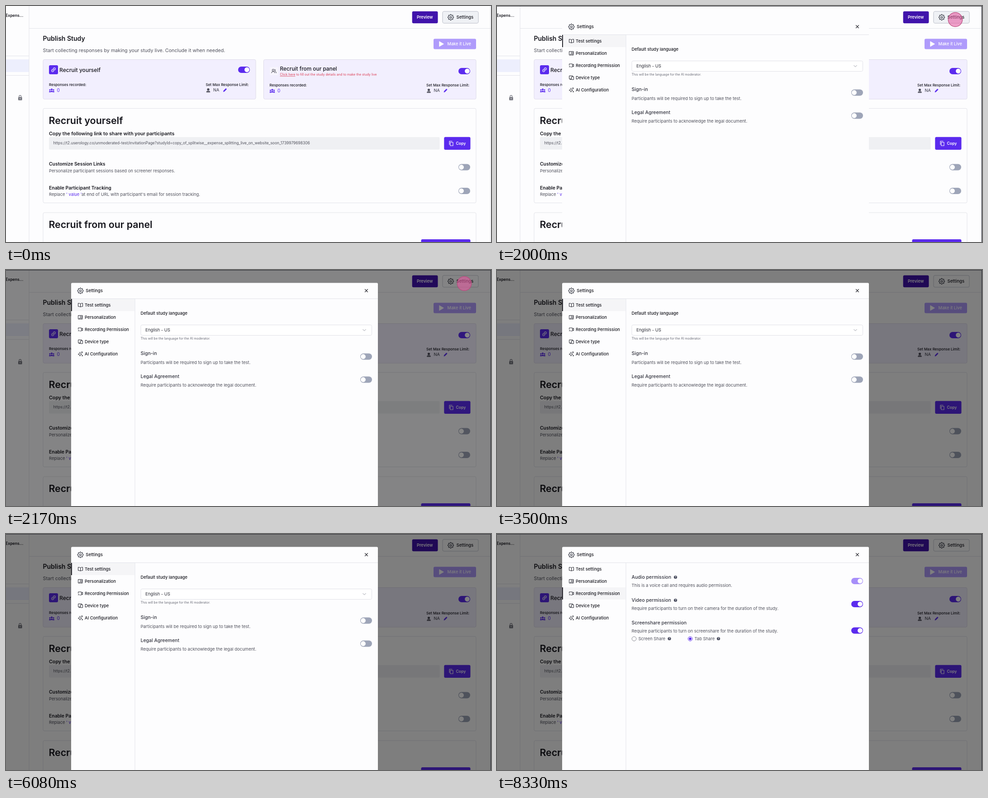
Animation of 1072x522 px, one loop 8.5 s. Source, as an HTML page:

```html
<!DOCTYPE html>
<html lang="en">
<head>
<meta charset="utf-8">
<title>Study settings</title>
<style>
html, body { margin: 0; width: 100%; height: 100%; overflow: hidden; background: #fdfdfe; }
svg { display: block; width: 100%; height: 100%; }
text { font-family: Inter, "Open Sans", sans-serif; white-space: pre; }
</style>
</head>
<body>
<svg id="stage" viewBox="0 0 1072 522"></svg>
<script>
const NS = 'http://www.w3.org/2000/svg';
const LOOP = 8500;
const INK = '#16161d', BODY = '#50515c', PURPLE = '#5b2bee', LINE = '#e2e3e9';
const stage = document.getElementById('stage');
let layer = stage;

function add(tag, attrs, text) {
  const el = document.createElementNS(NS, tag);
  for (const k in attrs) el.setAttribute(k, attrs[k]);
  if (text) el.textContent = text;
  layer.appendChild(el);
  return el;
}
function group(parent, draw) {
  const old = layer;
  layer = parent;
  const g = add('g', {});
  layer = g;
  draw();
  layer = old;
  return g;
}
const rect = (x, y, width, height, fill, rx = 0, stroke = 'none') =>
  add('rect', { x, y, width, height, fill, rx, stroke });
const text = (x, y, size, str, fill = INK, weight = 400) =>
  add('text', { x, y, 'font-size': size, 'font-weight': weight, fill }, str);
const dot = (cx, cy, r, fill, stroke = 'none', width = 1) =>
  add('circle', { cx, cy, r, fill, stroke, 'stroke-width': width });
const rule = (x1, y1, x2, y2, stroke = LINE) => add('line', { x1, y1, x2, y2, stroke });
// Line icon drawn around its centre
const icon = (x, y, d, stroke = INK, width = 1.1, fill = 'none') =>
  add('path', { d, transform: `translate(${x} ${y})`, stroke, fill, 'stroke-width': width,
    'stroke-linecap': 'round', 'stroke-linejoin': 'round' });

function toggle(x, y, on, color = on ? PURPLE : '#9ea5b8') {
  rect(x - 13, y - 7, 26, 14, color, 7);
  dot(x + (on ? 6.5 : -6.5), y, 5.4, '#fff');
}
function gear(x, y) {
  const pts = [];
  for (let i = 0; i < 32; i++) {
    const a = (i - 0.5) * Math.PI / 16, r = i % 4 < 2 ? 6.4 : 4.9;
    pts.push((r * Math.cos(a)).toFixed(2) + ' ' + (r * Math.sin(a)).toFixed(2));
  }
  icon(x, y, 'M' + pts.join('L') + 'Z', '#2c2f3a');
  dot(x, y, 2, 'none', '#2c2f3a', 1.1);
}
function people(x, y) {
  for (const [dx, dy, r] of [[-4, -1, 1.5], [4, -1, 1.5], [0, -2, 2]]) {
    dot(x + dx, y + dy, r, PURPLE);
    icon(x + dx, y + dy + r + .8, `M${-r} 2.6V1.6Q${-r} 0 0 0T${r} 1.6V2.6Z`, PURPLE, .4, PURPLE);
  }
}
function help(x, y) {
  dot(x, y, 3.6, '#474a5c');
  text(x - 1.6, y + 2.1, 5.6, '?', '#fff', 700);
}
function counts(x, y) {
  text(x, y, 8.15, 'Responses recorded:', INK, 500);
  people(x + 6, y + 9.5);
  text(x + 17.5, y + 13, 10, '0', PURPLE);
  text(x + 346.5, y, 8.15, 'Set Max Response Limit:', INK, 500);
  dot(x + 352, y + 7.5, 2.6, '#4a4b57');
  icon(x + 352, y + 11, 'M-3.8 2.6V1.2Q-3.8 0 0 0T3.8 1.2V2.6Z', '#4a4b57', .6, '#4a4b57');
  text(x + 363, y + 12, 9.2, 'NA', '#33343f');
  icon(x + 389, y + 9, 'M-3.5 3.5L-3 1.2L2 -3.8L3.8 -2L-1.2 3Z', PURPLE, .5, PURPLE);
}

function sidebar() {
  text(-1, 24, 8.7, 'Expens...', INK, 600);
  rule(0, 110.5, 51, 110.5);
  rect(0, 118, 51, 28, '#edeffd');
  rule(0, 153.5, 51, 153.5);
  rect(27, 201.5, 8.5, 7, '#75767f', 1);
  icon(31.2, 201, 'M-2.3 1V-1A2.3 2.3 0 0 1 2.3 -1V1', '#75767f', 1.2);
  dot(31.2, 205, 1, '#fff');
  rule(51, 0, 51, 522);
}
function topBar() {
  rule(51, 49.5, 1072, 49.5);
  rect(897.7, 11.8, 56.8, 26.4, '#4013ab', 3);
  text(908, 28.3, 9.2, 'Preview', '#fff', 600);
  rect(965, 12, 79, 26, '#fdfdfe', 3, '#c6c9d2');
  hover = rect(965, 12, 79, 26, '#eff1f5', 3, '#c6c9d2');
  gear(983, 25);
  text(995.5, 28.3, 9.6, 'Settings', INK, 500);
}
function cards() {
  text(81.5, 76.5, 14, 'Publish Study', INK, 600);
  text(81.5, 102, 10.72, 'Start collecting responses by making your study live. Conclude it when needed.', BODY);
  rect(945, 72.5, 94, 23, '#af9bfb', 3);
  icon(962.5, 84, 'M-4.5 -5.5L5 0L-4.5 5.5Z', '#fff', .8, '#fff');
  text(975.5, 87.4, 9.2, 'Make it Live', '#fff', 500);

  rect(82, 118.5, 470, 87.5, '#f2effe', 3, '#dedbea');
  rect(95, 131, 20, 20, PURPLE, 3);
  icon(105, 141, 'M-1 -2.2L.8 -4A2.3 2.3 0 0 1 4 -.8L2.2 1M1 2.2L-.8 4A2.3 2.3 0 0 1 -4 .8L-2.2 -1M-1.5 1.5L1.5 -1.5', '#fff', 1.1);
  text(118, 145.5, 12.05, 'Recruit yourself', INK, 500);
  toggle(526, 141, true);
  counts(95, 177);

  rect(569.5, 118.5, 469.5, 87.5, '#f2effe', 3, '#dedbea');
  rect(583, 135, 19, 18, '#f7f5fd', 2);
  dot(590.5, 142, 2.2, 'none', '#33343f');
  icon(592, 148, 'M-5.3 0Q-4.8 -3.2 -1.5 -3.2T2.3 0M2 -8A2.2 2.2 0 0 1 2 -3.8M3 -3.2Q5.3 -2.8 5.5 0', '#33343f', 1);
  text(605.5, 143, 11.85, 'Recruit from our panel', INK, 500);
  const note = text(605.5, 154.3, 7.18, '', '#dc3f55');
  for (const [str, line] of [['Click here', 'underline'], [' to fill out the study details and to make the study live', 'none']]) {
    const span = document.createElementNS(NS, 'tspan');
    span.textContent = str;
    span.setAttribute('text-decoration', line);
    note.appendChild(span);
  }
  toggle(1013, 144, true);
  counts(582.5, 178);
}
function linkBox() {
  rect(82, 226.5, 957, 209, '#fdfdfe', 3, LINE);
  text(94.5, 261, 21.4, 'Recruit yourself', INK, 600);
  text(95, 286.3, 10.7, 'Copy the following link to share with your participants', INK, 600);
  rect(95, 290, 863.5, 27.5, '#eff0f3', 2);
  text(104.5, 306.3, 8.44, 'https://t2.userology.co/unmoderated-test/invitationPage?studyId=copy_of_splitwise__expense_splitting_live_on_website_soon_1739979698306', BODY);
  rect(968.3, 289.8, 58.2, 28.2, PURPLE, 3);
  icon(984, 304, 'M-2 -2.5H4V5H-2ZM-4 2.5V-5H2', '#fff', 1.1);
  text(994.5, 307.2, 8.6, 'Copy', '#fff', 600);
  text(95, 353, 10.35, 'Customize Session Links', INK, 600);
  text(95, 367.8, 9.36, 'Personalize participant sessions based on screener responses.', BODY);
  toggle(1013, 356.5, false);
  text(95, 405.5, 10.4, 'Enable Participant Tracking', INK, 600);
  text(95, 420, 9.4, 'Replace', BODY);
  text(133, 420, 9.4, "' value '", PURPLE);
  text(167, 420, 9.52, "at end of URL with participant's email for session tracking.", BODY);
  toggle(1013, 409, false);
  rect(82, 457, 957, 90, '#fdfdfe', 3, LINE);
  text(94.5, 490.7, 21.3, 'Recruit from our panel', INK, 600);
  rect(917.5, 516, 109, 20, PURPLE, 3);
}

function testPane() {
  text(297.5, 98.5, 9.35, 'Default study language', INK, 500);
  rect(298, 121.5, 510.5, 23, '#fff', 3, '#e0e1e7');
  text(308, 136.2, 9.45, 'English - US', '#2b2c36');
  icon(792, 133, 'M-3.2 -1.6L0 1.6L3.2 -1.6', '#92959f', 1);
  text(297.5, 154.3, 7.08, 'This will be the language for the AI moderator.', '#686a75');
  text(297.5, 188, 10.5, 'Sign-in', '#33343f', 500);
  text(297.5, 207.5, 9.47, 'Participants will be required to sign up to take the test.', BODY);
  toggle(796, 191.5, false);
  text(297.5, 239, 10.5, 'Legal Agreement', '#33343f', 500);
  text(297.5, 258.2, 9.52, 'Require participants to acknowledge the legal document.', BODY);
  toggle(796, 242.5, false);
}
function recordPane() {
  const rows = [
    [99, 'Audio permission', 'This is a voice call and requires audio permission.', 104, '#a78ff9'],
    [150, 'Video permission', 'Require participants to turn on their camera for the duration of the study.', 155, PURPLE],
    [200, 'Screenshare permission', 'Require participants to turn on screenshare for the duration of the study.', 213.5, PURPLE]
  ];
  rows.forEach(([y, title, info, ty, color], i) => {
    text(297.5, y, 10.5, title, '#33343f', 500);
    text(297.5, y + 17.5, 9.47, info, BODY);
    toggle(796, ty, true, color);
    if (i < 2) help(394.5, y - 3.5);
  });
  dot(303, 231.8, 4.8, '#fff', '#81838d');
  text(312.5, 235.3, 9.4, 'Screen Share', BODY);
  help(381, 231.5);
  dot(427, 231.8, 4.8, '#fff', PURPLE);
  dot(427, 231.8, 2.9, PURPLE);
  text(436.5, 235.3, 9.4, 'Tab Share', BODY);
  help(489.5, 231.5);
}
function activeRow(y) {
  rect(144.5, y, 140, 27, '#f5f5f7');
  rect(144, y, 1.8, 27, '#16161d');
}
function modalFrame() {
  add('path', { d: 'M144 522V31Q144 28.5 146.5 28.5H819.5Q822 28.5 822 31V522Z', fill: '#fdfdfe' });
  gear(164.5, 46);
  text(176.3, 49.3, 9.6, 'Settings', INK, 500);
  icon(796.5, 45.7, 'M-3 -3L3 3M3 -3L-3 3', INK, 1.2);
}
function modalMenu() {
  rule(144, 63.5, 822, 63.5);
  rule(285, 64, 285, 522);
  const items = [
    ['Test settings', 'M0 -2.8Q-1 -4 -5 -4V3.2Q-1 3.2 0 4.2Q1 3.2 5 3.2V-4Q1 -4 0 -2.8V4'],
    ['Personalization', 'M-4.5 -4H4.5V4H-4.5ZM-2.3 4V2.5Q0 .4 2.3 2.5V4M0 -2.3A1.2 1.2 0 1 0 .1 -2.3M3 -2V1'],
    ['Recording Permission', 'M-4.8 -1V-3.5H2.2V3.5H-.5M2.2 -.8L5 -2.8V2.8L2.2 .8M-4.8 1.2A2.4 2.4 0 0 1 -2.4 3.6M-4.8 3.6H-4.6'],
    ['Device type', 'M-1 2.5H-4.8V-4H3V-2.5M-3.5 4H-1M.6 -2H5V4.3H.6Z'],
    ['AI Configuration', 'M-1 -3.6Q-.6 .4 3.2 .7Q-.6 1 -1 5Q-1.4 1 -5.2 .7Q-1.4 .4 -1 -3.6ZM3.4 -5V-2M1.9 -3.5H4.9M4 3V5M3 4H5']
  ];
  items.forEach(([label, d], i) => {
    const y = 77.5 + 27 * i;
    icon(164.5, y, d, '#24252e', 1);
    text(174, y + 3.4, 9.4, label, INK, 500);
  });
}
function clickMark(x, y) {
  dot(x, y, 15.7, 'rgba(230, 90, 160, .58)', '#b84a7c', 1.2);
}

// Opacity from [ms, value] pairs; each value holds until the next one
function hold(el, steps) {
  const frames = [];
  steps.forEach(([t, opacity], i) => {
    if (i) frames.push({ offset: t / LOOP, opacity: steps[i - 1][1] });
    frames.push({ offset: t / LOOP, opacity });
  });
  frames.push({ offset: 1, opacity: steps[steps.length - 1][1] });
  el.animate(frames, { duration: LOOP, iterations: Infinity });
}

let hover;
group(stage, () => { sidebar(); topBar(); cards(); linkBox(); rule(1070.5, 0, 1070.5, 522); });
const shade = group(stage, () => rect(0, 0, 1072, 522, '#000'));
const edge = group(stage, () => { rect(0, 0, 1072, 1, '#33343a'); rect(1071, 0, 1, 522, '#33343a'); });
const modal = group(stage, modalFrame);
const test = group(modal, () => { activeRow(64); testPane(); });
const record = group(modal, () => { activeRow(118); recordPane(); });
group(modal, modalMenu);
const openMark = group(stage, () => clickMark(1013, 30));
const tabMark = group(stage, () => clickMark(219, 135));

hold(hover, [[0, 1], [2080, 0]]);
hold(shade, [[0, 0], [2080, .37], [2170, .48], [2250, .5]]);
hold(edge, [[0, 0], [1920, 1]]);
hold(modal, [[0, 0], [2000, 1]]);
hold(test, [[0, 1], [6250, 0]]);
hold(record, [[0, 0], [6250, 1]]);
hold(openMark, [[0, 0], [1920, 1], [2250, .8], [2330, .5], [2420, .2], [2500, 0]]);
hold(tabMark, [[0, 0], [6170, 1], [6750, .8], [6830, .5], [6920, .2], [7000, 0]]);
</script>
</body>
</html>
```
